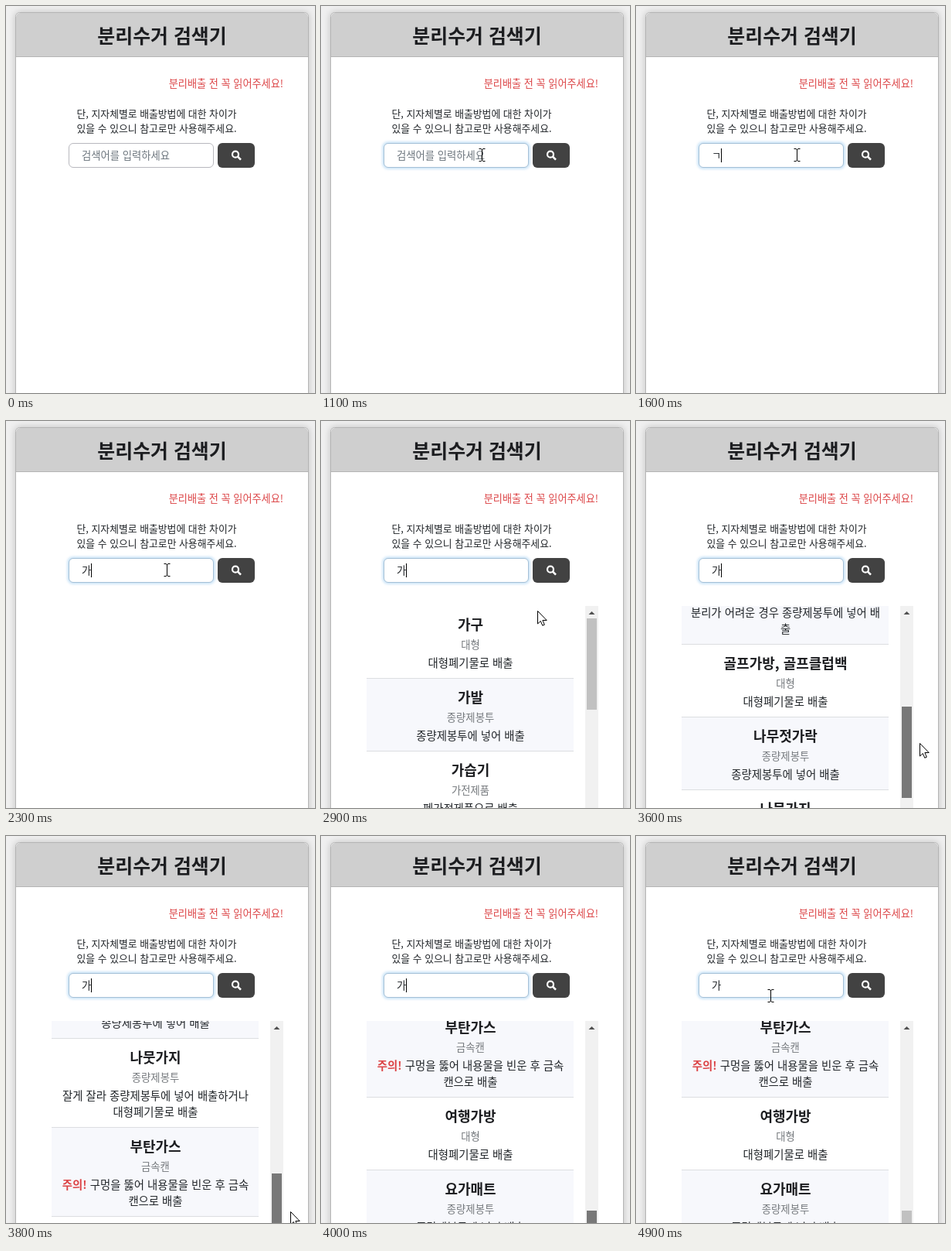
Animation, 400 px wide and 500 px high, one loop 5 s. Source, as an HTML page:

```html
<!DOCTYPE html>
<html lang="ko">
<head>
<meta charset="utf-8">
<style>
html, body { margin: 0; width: 100%; height: 100%; overflow: hidden; background: #f0f0f0; }
svg { display: block; width: 400px; height: 500px; font: 13.33px "Noto Sans CJK KR", "Noto Sans CJK", sans-serif; fill: #212529; }
.card { fill: #fff; stroke: #b4b4b4; filter: drop-shadow(0 0 5px rgba(0, 0, 0, .2)); }
.mid { text-anchor: middle; }
.head { font-size: 24.9px; font-weight: 700; fill: #1c1d20; }
.red { fill: #dc4446; }
.warn { font-size: 13.15px; font-weight: 500; }
.note { font-size: 12.85px; }
.name { font-size: 18px; font-weight: 700; fill: #1c1d20; }
.kind { fill: #75797d; }
.how { font-size: 14.4px; }
</style>
</head>
<body>
<svg viewBox="0 0 400 500">
  <defs><clipPath id="view"><rect x="59" y="239" width="268" height="261"/></clipPath></defs>
  <rect class="card" x="12.5" y="8.5" width="379" height="620" rx="5"/>
  <path d="M13 65V14a5 5 0 0 1 5-5H386a5 5 0 0 1 5 5V65z" fill="#cfcfcf"/>
  <path d="M13 65.5H391" stroke="#b4b4b4"/>
  <text class="mid head" x="202" y="48">분리수거 검색기</text>
  <text class="red warn" x="359" y="105" text-anchor="end">분리배출 전 꼭 읽어주세요!</text>
  <text class="note" x="91.5" y="144">단, 지자체별로 배출방법에 대한 차이가</text>
  <text class="note" x="91.5" y="163">있을 수 있으니 참고로만 사용해주세요.</text>

  <rect id="glow" x="79" y="175" width="192" height="36" rx="8" fill="#cfe6f8" style="filter:blur(1.5px)"/>
  <rect id="field" x="81.5" y="177.5" width="187" height="31" rx="5.5" fill="#fff"/>
  <text id="typed" x="98" y="198"></text>
  <path id="caret" d="M0 184V202" stroke="#000"/>
  <rect x="274" y="177" width="48" height="32" rx="6" fill="#424242"/>
  <g fill="none" stroke="#fff" stroke-width="2.2">
    <circle cx="297" cy="191.7" r="4"/>
    <path d="M300 194.7L304 198.7" stroke-width="2.6"/>
  </g>

  <g id="results">
    <g clip-path="url(#view)"><g id="list"></g></g>
    <rect x="342" y="239" width="17" height="261" fill="#f1f1f1"/>
    <path d="M346.5 250L350.5 246L354.5 250z" fill="#505050"/>
    <rect id="thumb" x="344" width="13" height="118"/>
  </g>

  <path id="arrow" d="M0 0V16.5L3.8 13L6.3 18.8L8.8 17.7L6.4 12H11.7z" fill="#fff" stroke="#000"/>
  <path id="beam" d="M-3.5 -7.5H-1L.5 -6.5L2 -7.5H4.5M.5 -7V7.5M-3.5 8.5H-1L.5 7.5L2 8.5H4.5" fill="none" stroke="#000"/>
</svg>
<script>
const $ = id => document.getElementById(id);
const LOOP = 5000, STEP = 100;

const bag = '종량제봉투', toBag = '종량제봉투에 넣어 배출', bulky = '대형폐기물로 배출';
const items = [
  ['가구', '대형', bulky],
  ['가발', bag, toBag],
  ['가습기', '가전제품', '폐가전제품으로 배출'],
  ['가위', bag, '재질별 분리가 가능할 경우 분리하여 배출,', '분리가 어려운 경우 종량제봉투에 넣어 배', '출'],
  ['골프가방, 골프클럽백', '대형', bulky],
  ['나무젓가락', bag, toBag],
  ['나뭇가지', bag, '잘게 잘라 종량제봉투에 넣어 배출하거나', bulky],
  ['부탄가스', '금속캔', '<tspan class="red" font-weight="700">주의!</tspan> 구멍을 뚫어 내용물을 빈운 후 금속', '캔으로 배출'],
  ['여행가방', '대형', bulky],
  ['요가매트', bag, toBag]
];

const line = (cls, y, s) => `<text class="mid ${cls}" x="193.5" y="${y}">${s}</text>`;
let rowY = 239, markup = '';
items.forEach(([name, kind, ...how], i) => {
  const h = 73 + 21 * how.length;
  markup += `<rect x="59" y="${rowY}" width="268" height="${h}" fill="${i % 2 ? '#f7f8fc' : '#fff'}"/>` +
    `<rect x="59" y="${rowY + h - 1}" width="268" height="1" fill="#dcdee1"/>` +
    line('name', rowY + 31, name) + line('kind', rowY + 55, kind) +
    how.map((s, n) => line('how', rowY + 79 + 21 * n, s)).join('');
  rowY += h;
});
$('list').innerHTML = markup;

// Keys are [time, value, ...]; values are interpolated linearly.
const scrollKeys = [[3150, 0], [3300, 96], [3600, 368], [3900, 690], [4000, 737]];
const mouseKeys = [
  [100, 327, 215], [300, 262, 203], [500, 208, 192], [2700, 208, 192],
  [3100, 352, 298], [3300, 353, 329], [3600, 367, 416], [3900, 368, 520],
  [4400, 345, 530], [4700, 222, 330], [4900, 174, 206]
];
function at(keys, t) {
  const n = keys.findIndex(k => k[0] > t);
  if (n < 0) return keys[keys.length - 1].slice(1);
  if (!n) return keys[0].slice(1);
  const a = keys[n - 1], b = keys[n], p = (t - a[0]) / (b[0] - a[0]);
  return a.slice(1).map((v, i) => v + (b[i + 1] - v) * p);
}

const show = (id, on) => $(id).style.display = on ? '' : 'none';

function draw(t) {
  const text = t < 1500 ? '' : t < 1900 ? 'ㄱ' : '가';
  const typed = $('typed');
  typed.textContent = text || '검색어를 입력하세요';
  typed.style.fill = text ? '#212529' : '#6c757d';

  $('glow').style.opacity = Math.min(1, Math.max(0, (t - 400) / 200));
  $('field').style.stroke = t < 500 ? '#b8b8be' : '#a3bfd6';
  show('caret', t >= 500 && t < 1000 || t >= 1500 && t < 4500);
  $('caret').setAttribute('transform', `translate(${text ? 110.5 : 98.5})`);

  const [scroll] = at(scrollKeys, t);
  show('results', t >= 2500);
  $('list').setAttribute('transform', `translate(0 ${-Math.round(scroll)})`);
  $('thumb').setAttribute('y', Math.round(255.2 + .3105 * scroll));
  $('thumb').style.fill = t >= 3150 && t < 4500 ? '#787878' : '#c1c1c1';

  const [x, y] = at(mouseKeys, t).map(Math.round);
  const inField = x > 81 && x < 269 && y > 177 && y < 209;
  show('beam', t >= 100 && inField);
  show('arrow', t >= 100 && !inField);
  $('beam').setAttribute('transform', `translate(${x} ${y})`);
  $('arrow').setAttribute('transform', `translate(${x + .5} ${y + .5})`);
}

function frame() {
  draw(Math.floor(performance.now() % LOOP / STEP) * STEP);
  requestAnimationFrame(frame);
}
frame();
</script>
</body>
</html>
```
